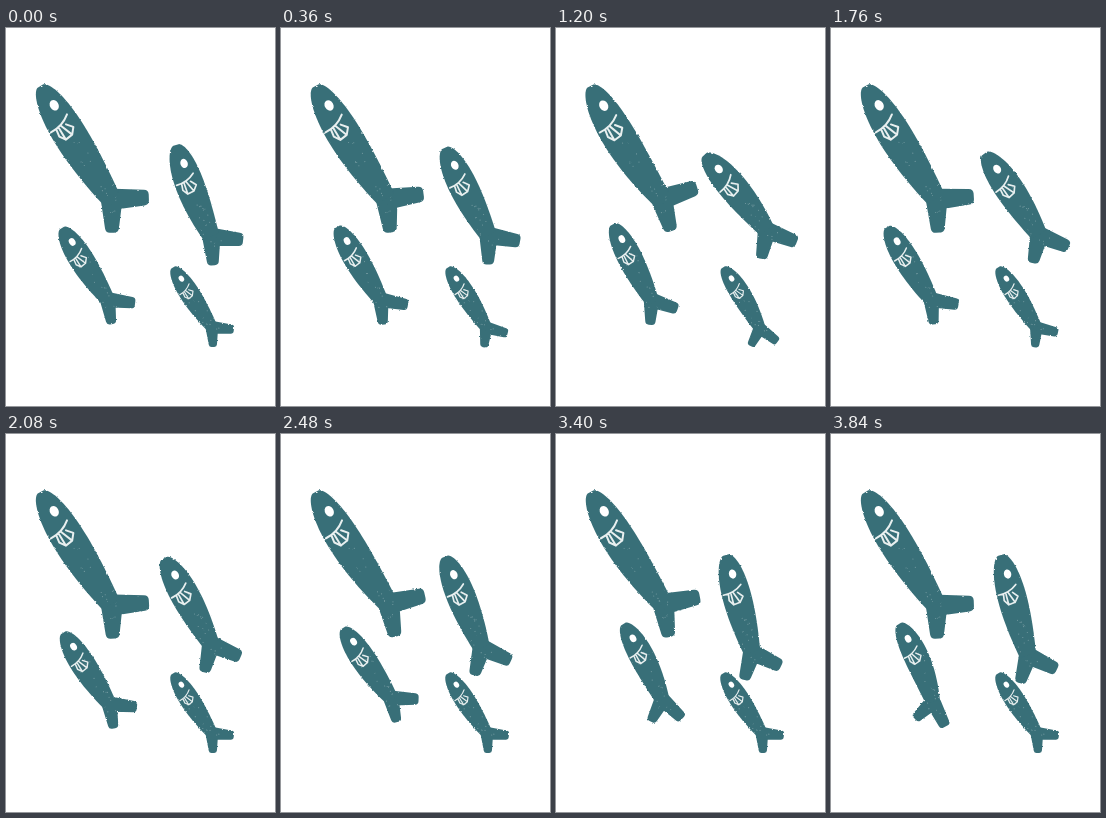
Animation, 269 px wide and 378 px high, one loop 3.88 s. Source, as an HTML page:

```html
<!DOCTYPE html>
<html lang="en">
<head>
<meta charset="utf-8">
<title>Swimming fish</title>
<style>
  html, body { margin: 0; width: 100%; height: 100%; overflow: hidden; background: #fff; }
  svg { display: block; width: 100vw; height: 100vh; }
  .body { fill: #386f78; }
  .tail { fill: #386f78; stroke: #386f78; stroke-linejoin: round; }
  .specks { fill: none; stroke: #fff; stroke-opacity: .3; stroke-linecap: round; }
  .eye { fill: #fff; }
  .gill { fill: none; stroke: #e8efef; stroke-width: 2; stroke-linecap: round; stroke-linejoin: round; }
</style>
</head>
<body>
<svg id="stage" viewBox="0 0 269 378">
  <filter id="rough" filterUnits="userSpaceOnUse" x="0" y="0" width="269" height="378" color-interpolation-filters="sRGB">
    <feTurbulence type="fractalNoise" baseFrequency=".45" numOctaves="2" seed="4"/>
    <feDisplacementMap in="SourceGraphic" scale="2.2" xChannelSelector="R" yChannelSelector="G"/>
  </filter>
  <g id="skins" filter="url(#rough)"></g>
  <g id="faces"></g>
</svg>
<script>
const LOOP = 3880, STEP = 40, RAD = Math.PI / 180;

// ease: 0 to 1 between two times; beat: up to 1 and back to 0
const ease = (t, from, to) =>
  (1 - Math.cos(Math.PI * Math.min(1, Math.max(0, (t - from) / (to - from))))) / 2;
const beat = (t, from, peak, to) => ease(t, from, peak) - ease(t, peak, to);

// move(t) gives nose x, nose y, body heading, tail heading and, if it stretches, body length
const shoal = [
  { size: 1, length: 133, spread: 45, move(t) {
    const half = LOOP / 2, flick = beat(t % half, 0, half / 2, half);
    return [34.5, 58, 58 - (t > half ? 1.7 * flick : 0), 43 - 18 * flick];
  } },
  { size: .85, length: 98, spread: 40, move(t) {
    const dip = ease(t, 0, 1000), rise = ease(t, 1000, 3300), stretch = ease(t, 3000, LOOP);
    return [170 - 22 * dip + 22 * rise, 117 + 10 * dip - 6 * rise,
      69 - 19 * dip + 25 * rise, 46 + 15 * dip + 5 * rise, 98 + 6 * stretch];
  } },
  { size: .73, length: 85, spread: 37, move(t) {
    const sway = beat(t, 0, 1000, 2100), climb = ease(t, 1800, 3000), curl = ease(t, 2600, LOOP);
    return [56 + sway + 10 * climb + 2 * curl, 200 - 4 * sway - 10 * climb,
      57.5 + 6 * sway - 3 * climb + 12 * curl, 44 + 13 * sway - 8 * climb + 64 * curl];
  } },
  { size: .59, length: 71, spread: 40, move(t) {
    const flick = beat(t, 0, 1000, 2100);
    return [167, 239.5, 57 + 2 * flick, 46 + 34 * flick];
  } }
];

// Half width of the body from nose (0) to tail (1)
const girth = along => 17 * Math.sin(Math.PI * (.04 + .79 * along ** .65)) ** .8;
const pair = (x, y) => x.toFixed(2) + ' ' + y.toFixed(2);
const outline = points => 'M' + points.join('L') + 'Z';

let seed = 7;
const random = () => (seed = seed * 16807 % 2147483647) / 2147483647;

function add(parent, tag, attrs) {
  const node = document.createElementNS('http://www.w3.org/2000/svg', tag);
  for (const name in attrs) node.setAttribute(name, attrs[name]);
  return parent.appendChild(node);
}

for (const fish of shoal) {
  const skins = document.getElementById('skins');
  fish.tailPath = add(skins, 'path', { class: 'tail', 'stroke-width': 10 * fish.size });
  fish.bodyPath = add(skins, 'path', { class: 'body' });
  fish.speckPath = add(skins, 'path', { class: 'specks', 'stroke-width': 1.1 });
  fish.face = add(document.getElementById('faces'), 'g', {});
  add(fish.face, 'ellipse', { class: 'eye', cx: 23.6, cy: -1.8, rx: 5.5, ry: 4.3 });
  add(fish.face, 'path', { class: 'gill',
    d: 'M38-8Q46 2 45 15M46-2L52-7 58-2 59 6 53 10 46 9M45 3L58-2M46 6L59 6' });
  fish.specks = Array.from({ length: 18 }, () => [.4 + .75 * random(), 1.5 * random() - .75]);
}

function pose(fish, t) {
  const { size, spread } = fish;
  const [x, y, body, tail, length = fish.length] = fish.move(t);
  const cos = Math.cos(body * RAD), sin = Math.sin(body * RAD);
  const bend = length * .0034 * (tail - body + 6);

  // Point on the bent body: along from nose to tail, across to either side
  const at = (along, across) => {
    const side = across - bend * along * (1 - along);
    const reach = length * along + across * bend * (1 - 2 * along) / length;
    return [x + reach * cos - side * sin, y + reach * sin + side * cos];
  };

  const edge = [];
  for (let i = 0; i <= 32; i++) {
    const along = (i / 32) ** 2, half = size * girth(along);
    edge.push(pair(...at(along, -half)));
    edge.unshift(pair(...at(along, half)));
  }
  fish.bodyPath.setAttribute('d', outline(edge));

  // The fork: a broad upper lobe and a tapered lower one
  const [jx, jy] = at(1, 0);
  const fork = (turn, reach) => pair(
    jx + reach * size * Math.cos((tail + turn) * RAD),
    jy + reach * size * Math.sin((tail + turn) * RAD));
  fish.tailPath.setAttribute('d', outline([
    fork(-100, 6), fork(-spread - 5, 33), fork(-spread + 5, 33), fork(0, 8),
    fork(spread - 4, 29), fork(spread + 4, 29), fork(100, 6)]));

  fish.speckPath.setAttribute('d',
    fish.specks.map(([along, side]) => `M${pair(...at(along, side * 13 * size))}h.01`).join(''));

  const heading = body - Math.atan(bend / 2 / length) / RAD;
  fish.face.setAttribute('transform', `translate(${pair(x, y)}) rotate(${heading}) scale(${size})`);
}

function draw() {
  const t = Math.floor(performance.now() % LOOP / STEP) * STEP;
  for (const fish of shoal) pose(fish, t);
  requestAnimationFrame(draw);
}
draw();
</script>
</body>
</html>
```
